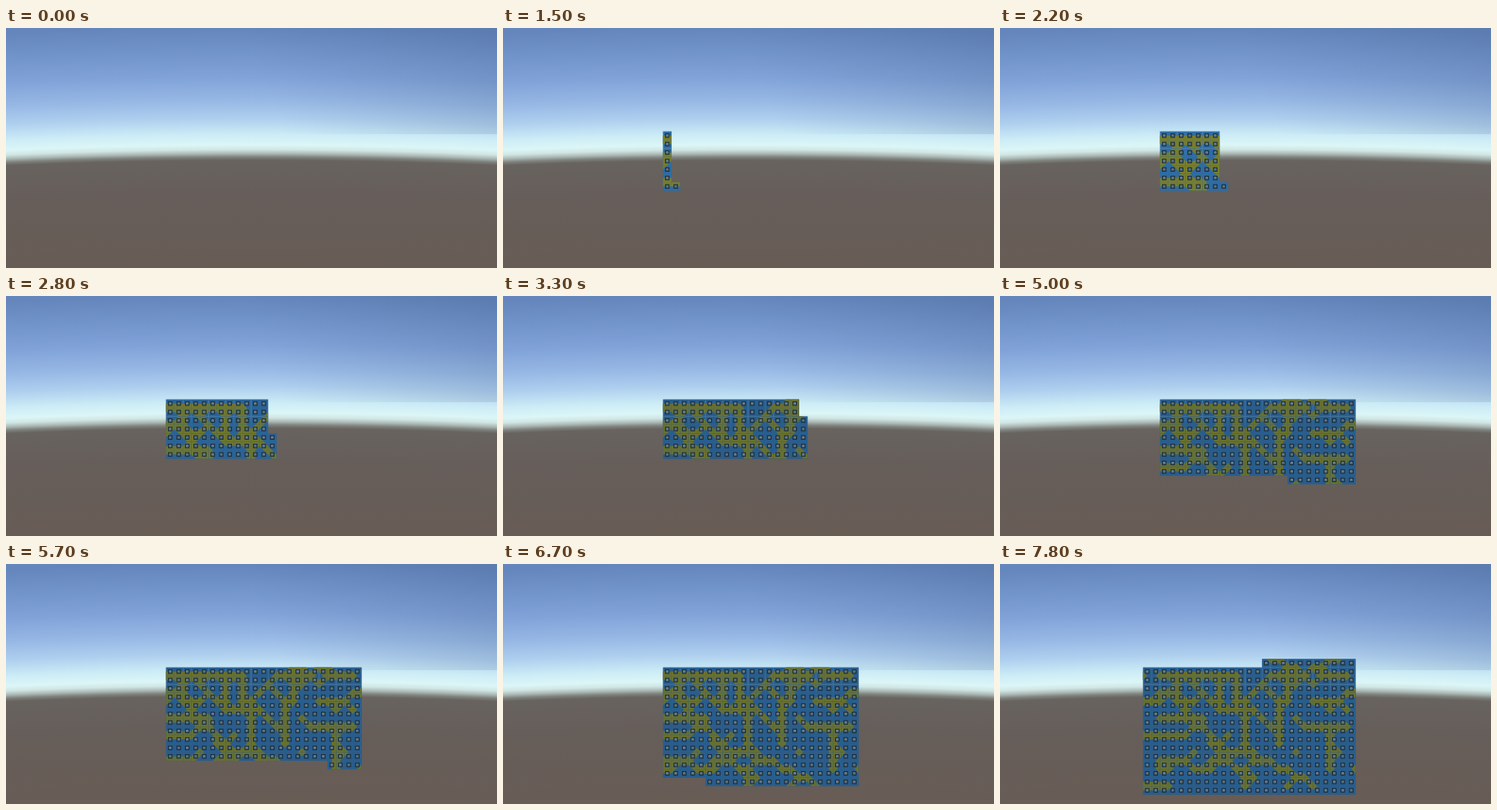
An HTML page with a canvas for the animation above (8 s loop, 600x294 px).

```html
<!DOCTYPE html>
<html lang="en">
<head>
<meta charset="utf-8">
<title>Growing tile map</title>
<style>
  html, body { margin: 0; width: 100%; height: 100%; overflow: hidden; background: #675d58; }
  canvas { display: block; width: 600px; height: 294px; }
</style>
</head>
<body>
<canvas id="stage" width="600" height="294"></canvas>
<script>
const W = 600, H = 294, LOOP = 8000;
const COLS = 25, ROWS = 16, SIZE = 10.39, LEFT = 174.7, TOP = 116.2;
const ctx = document.getElementById('stage').getContext('2d');

// Number of placed tiles over time
const GROWTH = [[1400, 2], [2200, 50], [3300, 117], [4400, 179], [5700, 257],
  [6700, 317], [6800, 324], [7200, 345], [7400, 358], [7600, 372], [7800, 386]];

// Olive veins, as column,row points on the corner lattice
const VEINS = [
  '2,2 6,2', '7,2 9,2 9,6 11,6 14,3', '6,3 9,6', '11,2 11,4', '11,5 14,7',
  '2,4 4,4 5,5 5,7', '2,7 7,7', '15,4 16,5 16,8', '15,2 18,2', '17,4 19,2',
  '20,3 21,2 24,2', '20,5 22,5 24,4', '18,7 20,8 24,8', '2,9 5,9 6,8', '7,8 8,10 10,11 13,11',
  '12,7 12,10', '15,8 16,10', '2,12 5,12 6,13 8,13', '9,12 12,13 12,15',
  '13,12 15,12 17,13 20,15', '22,11 22,13', '0,5 2,5', '0,9 2,9', '0,15 3,15',
  '15,0 18,1', '20,1 23,0'
];

function noise(x, y) {
  const s = Math.sin(x * 127.1 + y * 311.7) * 43758.5453;
  return s - Math.floor(s);
}

function buildCorners() {
  const olive = new Set();
  for (const vein of VEINS) {
    const pts = vein.split(' ').map(p => p.split(',').map(Number));
    for (let i = 1; i < pts.length; i++) {
      const [x0, y0] = pts[i - 1], [x1, y1] = pts[i];
      const n = Math.max(Math.abs(x1 - x0), Math.abs(y1 - y0));
      for (let k = 0; k <= n; k++) {
        olive.add(Math.round(x0 + (x1 - x0) * k / n) + ',' + Math.round(y0 + (y1 - y0) * k / n));
      }
    }
  }
  for (let y = 0; y <= ROWS; y++)
    for (let x = 0; x <= COLS; x++)
      if (noise(x, y) < 0.1) olive.add(x + ',' + y);
  return olive;
}

// Columns to the right, rows below, columns to the left, then the top row
function buildOrder() {
  const cells = [];
  const column = (x, low, high) => { for (let y = low; y >= high; y--) cells.push([x, y]); };
  const row = (y, right, left) => { for (let x = right; x >= left; x--) cells.push([x, y]); };
  for (let x = 2; x < COLS; x++) column(x, 7, 1);
  for (let y = 8; y < ROWS; y++) row(y, COLS - 1, 2);
  column(1, 15, 1);
  column(0, 15, 1);
  row(0, COLS - 1, 0);
  return cells;
}

function buildSky() {
  const layer = document.createElement('canvas');
  layer.width = W;
  layer.height = H;
  const g = layer.getContext('2d');
  const stops = [[0, '#6486bd'], [30, '#7194cb'], [60, '#80a2d8'], [90, '#98b9e5'],
    [112, '#b0d0ef'], [130, '#cbebf6'], [143, '#dcf6f7'], [149, '#d0e6e4'],
    [154, '#aab7b3'], [158, '#7f827d'], [162, '#68635f'], [200, '#665e5a'], [294, '#685c55']];
  for (let x = 0; x < W; x++) {
    const bend = 6.5 * ((x - 300) / 300) ** 2;
    const grad = g.createLinearGradient(0, bend, 0, H + bend);
    for (const [y, color] of stops) grad.addColorStop(y / H, color);
    g.fillStyle = grad;
    g.fillRect(x, 0, 1, H);
  }
  const shade = g.createLinearGradient(330, 110, 600, 0);
  shade.addColorStop(0, 'rgba(50,75,110,0)');
  shade.addColorStop(1, 'rgba(50,75,110,.16)');
  g.fillStyle = shade;
  g.fillRect(0, 0, W, 130);
  return layer;
}

const corners = buildCorners(), order = buildOrder(), sky = buildSky();

function tileCount(t) {
  if (t < GROWTH[0][0]) return 0;
  const now = t < 6800 ? Math.floor(t / 100) * 100 : Math.floor(t / 200) * 200;
  for (let i = 1; i < GROWTH.length; i++) {
    const [t0, n0] = GROWTH[i - 1], [t1, n1] = GROWTH[i];
    if (now <= t1) return Math.round(n0 + (n1 - n0) * (now - t0) / (t1 - t0));
  }
  return GROWTH[GROWTH.length - 1][1];
}

function mix(a, b, k) {
  return 'rgb(' + a.map((v, i) => Math.round(v + (b[i] - v) * k)) + ')';
}

function drawTile(col, row, blue, green) {
  const x = LEFT + col * SIZE, y = TOP + row * SIZE;
  const ring = [[0, 0], [1, 0], [1, 1], [0, 1]];
  const isOlive = ([dx, dy]) => corners.has((col + dx) + ',' + (row + dy));
  ctx.fillStyle = blue;
  ctx.fillRect(x, y, SIZE + 0.2, SIZE + 0.2);

  const shape = [];
  ring.forEach((p, i) => {
    const q = ring[(i + 1) % 4];
    if (isOlive(p)) shape.push(p);
    if (isOlive(p) !== isOlive(q)) shape.push([(p[0] + q[0]) / 2, (p[1] + q[1]) / 2]);
  });
  if (shape.length) {
    ctx.beginPath();
    for (const [dx, dy] of shape) ctx.lineTo(x + dx * SIZE, y + dy * SIZE);
    ctx.closePath();
    ctx.fillStyle = green;
    ctx.fill();
  }

  const cx = x + SIZE / 2, cy = y + SIZE / 2;
  ctx.fillStyle = '#1c2b38';
  ctx.fillRect(cx - 2.7, cy - 2.7, 5.4, 5.4);
  ctx.fillStyle = noise(col + 40, row) < 0.5 ? '#7590a0' : '#66818c';
  ctx.fillRect(cx - 1.5, cy - 1.5, 3, 3);
  ctx.fillStyle = '#3c5265';
  ctx.fillRect(cx - 0.4, cy - 0.5, 0.8, 2);
}

function render(t) {
  ctx.drawImage(sky, 0, 0);
  const dim = Math.min(1, Math.max(0, (t - 2200) / 1000));
  const blue = mix([46, 108, 164], [40, 93, 141], dim);
  const green = mix([120, 126, 44], [104, 113, 48], dim);
  const n = tileCount(t);
  for (let i = 0; i < n; i++) drawTile(order[i][0], order[i][1], blue, green);
}

const start = performance.now();
function frame() {
  render((performance.now() - start) % LOOP);
  requestAnimationFrame(frame);
}
frame();
</script>
</body>
</html>
```
